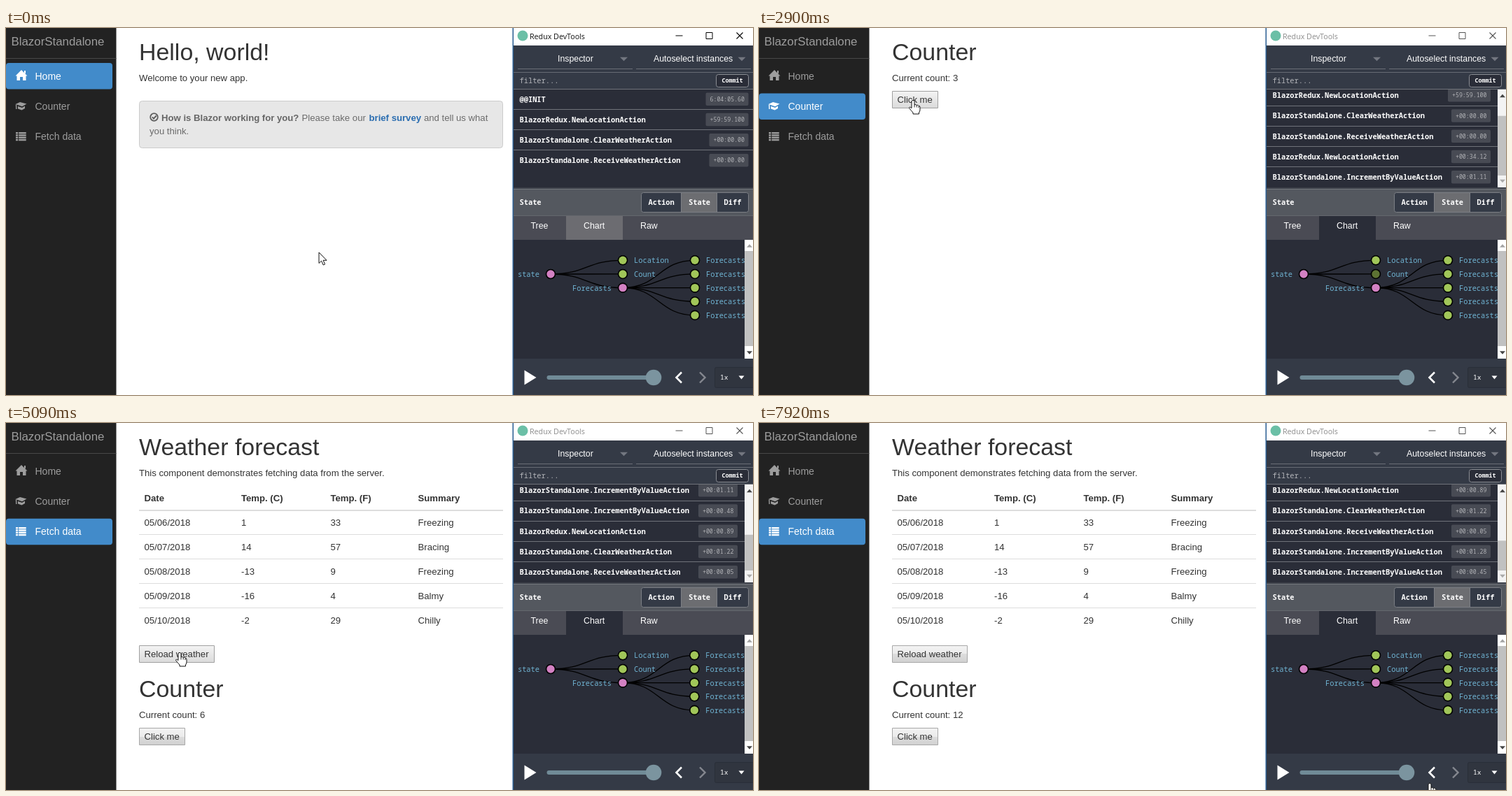
Animation of 1067x525 px, one loop 8 s. Source, as an HTML page with a canvas:

```html
<!DOCTYPE html>
<html lang="en">
<head>
<meta charset="utf-8">
<title>Store demo</title>
<style>
html, body { margin: 0; width: 100%; height: 100%; overflow: hidden; background: #fff; }
canvas { display: block; }
</style>
</head>
<body>
<canvas id="stage" width="1067" height="525"></canvas>
<script>
const g = document.getElementById('stage').getContext('2d');
const LOOP = 8000;
const SANS = '"Liberation Sans", Arial, sans-serif';
const MONO = '"Noto Sans Mono", "DejaVu Sans Mono", monospace';
const UI = '"Open Sans", "Noto Sans", sans-serif';
const BODY = 13.15, CODE = 10.37, ROW = 29.2;

// Cursor keys: time, x, y, linear
const PATH = [
  [0, 447, 321], [240, 447, 321], [1020, 100, 134], [1400, 86, 114], [1620, 86, 114],
  [2350, 220, 103], [3100, 220, 103], [3530, 104, 155], [4000, 104, 155], [4770, 248, 328],
  [5250, 248, 328], [6030, 232, 448], [6930, 232, 448], [7290, 589, 449, 1],
  [7610, 824, 463, 1], [7900, 958, 515, 1], [LOOP, 958, 515]
];

const MOVE = 'BlazorRedux.NewLocationAction';
const CLEAR = 'BlazorStandalone.ClearWeatherAction';
const RECEIVE = 'BlazorStandalone.ReceiveWeatherAction';
const ADD = 'BlazorStandalone.IncrementByValueAction';
const LOG = [
  [0, '@@INIT', '6:04:05.60'], [0, MOVE, '+59:59.100'],
  [0, CLEAR, '+00:00.00'], [0, RECEIVE, '+00:00.00'],
  [1560, MOVE, '+00:34.12'], [2600, ADD, '+00:01.11'],
  [3110, ADD, '+00:00.48'], [3800, MOVE, '+00:00.89'],
  [4960, CLEAR, '+00:01.22'], [5060, RECEIVE, '+00:00.05'],
  [6300, ADD, '+00:01.28'], [6770, ADD, '+00:00.45']
];
const CLICKS = [2560, 3010, 6250, 6760];
const FLASH = { Location: [1640, 3840], Count: [2640, 3140, 6400, 6890] };
const WEATHER = [
  ['05/06/2018', 1, 33, 'Freezing'], ['05/07/2018', 14, 57, 'Bracing'],
  ['05/08/2018', -13, 9, 'Freezing'], ['05/09/2018', -16, 4, 'Balmy'],
  ['05/10/2018', -2, 29, 'Chilly']
];
const COLS = [197.5, 336, 463.5, 588.5];

const ARROW = new Path2D('M0 0V15.5L3.6 12.2L6.2 18L8.6 17L6.1 11.3H11Z');
const HAND = new Path2D('M-2 1.5Q0 -1 2 1.5V7Q4 5.5 5.2 7.6Q7 6.3 8 8.4Q10 8 10 10.5V14Q10 16 8.5 18V20H0V18Q-2 16 -5.5 11.5Q-5.5 9 -2 11.5Z');

function text(s, x, y, size, color, font = SANS, weight = 400, align = 'left') {
  g.font = `${weight} ${size}px ${font}`;
  g.fillStyle = color;
  g.textAlign = align;
  g.fillText(s, x, y + size * 0.35);
}
const code = (s, x, y, color = '#fff', weight = 600, size = CODE, align) =>
  text(s, x, y, size, color, MONO, weight, align);

function rect(x, y, w, h, fill) {
  g.fillStyle = fill;
  g.fillRect(x, y, w, h);
}
function box(x, y, w, h, r, fill, stroke) {
  g.beginPath();
  g.roundRect(x, y, w, h, r);
  if (fill) { g.fillStyle = fill; g.fill(); }
  if (stroke) { g.strokeStyle = stroke; g.lineWidth = 1; g.stroke(); }
}
function poly(points, fill) {
  g.beginPath();
  points.forEach(p => g.lineTo(p[0], p[1]));
  g.fillStyle = fill;
  g.fill();
}
function line(points, color, width) {
  g.beginPath();
  points.forEach(p => g.lineTo(p[0], p[1]));
  g.strokeStyle = color;
  g.lineWidth = width;
  g.stroke();
}
function disc(x, y, r, fill) {
  g.beginPath();
  g.arc(x, y, r, 0, 7);
  g.fillStyle = fill;
  g.fill();
}
const caret = (x, y, w, h, color) => poly([[x - w, y - h], [x + w, y - h], [x, y + h]], color);
const inside = (c, x, y, w, h) => c.x >= x && c.x <= x + w && c.y >= y && c.y <= y + h;

function cursorAt(t) {
  let i = 1;
  while (i < PATH.length - 1 && PATH[i][0] < t) i++;
  const a = PATH[i - 1], b = PATH[i];
  let k = (t - a[0]) / (b[0] - a[0]);
  if (!b[3]) k = k * k * (3 - 2 * k);
  return { x: a[1] + (b[1] - a[1]) * k, y: a[2] + (b[2] - a[2]) * k, hand: false };
}

function homeIcon(c) {
  poly([[13.5, 68.5], [22, 60], [30.5, 68.5], [28.5, 68.5], [28.5, 75], [24, 75],
    [24, 70], [20, 70], [20, 75], [15.5, 75], [15.5, 68.5]], c);
  rect(26, 61, 2, 4, c);
}
function capIcon(c) {
  poly([[13.5, 109], [20, 106], [29.5, 108.5], [23, 112.2]], c);
  poly([[17, 112], [23, 114], [27, 111.5], [27, 115], [22.5, 117.5], [17, 115.5]], c);
  line([[14.5, 109.5], [14.8, 116]], c, 1.4);
}
function listIcon(c) {
  for (let i = 0; i < 4; i++) {
    rect(14, 149 + i * 3.3, 3.2, 2.4, c);
    rect(18.2, 149 + i * 3.3, 10.5, 2.4, c);
  }
}

function sidebar(page, cur) {
  rect(0, 0, 157.5, 525, '#222');
  text('BlazorStandalone', 7.5, 19.5, 16.85, '#9d9d9d');
  rect(0, 43, 157.5, 1, '#484848');
  [['Home', homeIcon], ['Counter', capIcon], ['Fetch data', listIcon]].forEach(([name, icon], i) => {
    const y = 50 + i * 43.4, active = i === page;
    const color = active || inside(cur, 0, y, 152, 37.5) ? '#fff' : '#9d9d9d';
    if (active) box(0, y, 152, 37.5, 4, '#428bca');
    icon(color);
    text(name, 41.5, y + 18.7, 14, color);
  });
}

function button(label, y, w, cur) {
  const hot = inside(cur, 190, y, w, 25);
  const fill = g.createLinearGradient(0, y, 0, y + 25);
  const stops = hot ? [[0, '#f4f4f4'], [1, '#dadada']]
    : [[0, '#f3f3f3'], [0.5, '#ebebeb'], [0.5, '#dddddd'], [1, '#d0d0d0']];
  stops.forEach(s => fill.addColorStop(s[0], s[1]));
  box(190.5, y + 0.5, w - 1, 24, 0, fill, hot ? '#a0a0a0' : '#a8a8a8');
  text(label, 197.5, y + 12, BODY, '#333');
  if (hot) cur.hand = true;
}
const title = (s, y) => text(s, 190, y, 33.9, '#333');
const para = (s, y) => text(s, 190, y, BODY, '#333');

function counter(y, count, cur) {
  title('Counter', y);
  para('Current count: ' + count, y + 37);
  button('Click me', y + 56, 66, cur);
}

function home() {
  title('Hello, world!', 34);
  para('Welcome to your new app.', 71);
  box(190.5, 104.5, 519, 67, 4, '#e7e7e7', '#cbcbcb');
  g.beginPath();
  g.arc(211.5, 127.5, 5.3, 0, 7);
  g.strokeStyle = '#5f5f5f';
  g.lineWidth = 1.8;
  g.stroke();
  line([[208.8, 127.3], [211, 129.6], [214.6, 125.5]], '#5f5f5f', 1.9);
  text('How is Blazor working for you?', 222, 128.5, BODY, '#666', SANS, 700);
  text('Please take our', 422.5, 128.5, BODY, '#6b6b6b');
  text('brief survey', 518.5, 128.5, BODY, '#2a6db0', SANS, 700);
  text('and tell us what', 597, 128.5, BODY, '#6b6b6b');
  text('you think.', 205, 147.5, BODY, '#6b6b6b');
}

function forecast(loading, count, cur) {
  title('Weather forecast', 34);
  para('This component demonstrates fetching data from the server.', 71);
  if (loading) {
    para('Loading...', 99);
    counter(146, count, cur);
    return;
  }
  ['Date', 'Temp. (C)', 'Temp. (F)', 'Summary'].forEach((s, i) =>
    text(s, COLS[i], 107, BODY, '#333', SANS, 700));
  rect(190, 124, 520, 2, '#ddd');
  WEATHER.forEach((row, r) => {
    const y = 142.5 + r * 34.9;
    if (r) rect(190, Math.round(y - 18), 520, 1, '#ddd');
    row.forEach((v, i) => text(String(v), COLS[i], y, BODY, '#333'));
  });
  button('Reload weather', 318, 108, cur);
  counter(380, count, cur);
}

function titleBar(active) {
  const ink = active ? '#000' : '#555';
  rect(724, 0, 343, 25, '#fff');
  disc(738, 11, 7.5, '#6bbfa6');
  text('Redux DevTools', 748, 11.8, 10.7, active ? '#111' : '#8c8c8c', UI);
  rect(956.5, 10.5, 10, 1, ink);
  box(1000, 6.5, 9, 9, 0, null, ink);
  line([[1043.5, 6.5], [1052.5, 15.5]], ink, 1.1);
  line([[1052.5, 6.5], [1043.5, 15.5]], ink, 1.1);
}

function actionList(t) {
  const log = LOG.filter(e => e[0] <= t), n = log.length;
  const full = n * ROW > 141, right = full ? 1045 : 1060.5;
  g.save();
  g.beginPath();
  g.rect(725, 88, 342, 140);
  g.clip();
  log.forEach((e, i) => {
    const y = full ? 213.4 - ROW * (n - 1 - i) : 102 + ROW * i;
    if (y < 80) return;
    if (i < n - 1) rect(725, Math.round(y + 14), 342, 1, '#70737a');
    code(e[1], 733.5, y);
    const w = e[2].length * 4.95 + 11.5;
    box(right - w, y - 9.5, w, 18.5, 2, '#484b54');
    code(e[2], right - 5.5, y, '#b2b3b7', 400, 8.25, 'right');
  });
  if (full) {
    rect(1055, 88, 12, 140, '#f3f3f3');
    const len = 106 * 141 / (n * ROW);
    rect(1055, 211 - len, 12, len, '#c1c1c1');
    caret(1062, 97, 4, -2.2, '#444');
    caret(1062, 219, 4, 2.2, '#aaa');
  }
  g.restore();
}

function flash(name, t) {
  const start = (FLASH[name] || []).filter(s => s <= t).pop();
  const k = start === undefined ? 1 : Math.min(1, (t - start) / 750);
  return 1 - (1 - k) * (1 - k);
}
function link(x0, y0, x1, y1) {
  const m = (x0 + x1) / 2;
  g.beginPath();
  g.moveTo(x0, y0);
  g.bezierCurveTo(m, y0, m, y1, x1, y1);
  g.strokeStyle = '#000';
  g.lineWidth = 1.3;
  g.stroke();
}
function node(x, y, label, parent, level = 1) {
  const rgb = (parent ? [211, 129, 195] : [161, 198, 89]).map(v => Math.round(v * level));
  disc(x, y, 7.3, '#000');
  disc(x, y, 5.7, `rgb(${rgb})`);
  code(label, x + (parent ? -16 : 16), y + 0.5, '#6fb3d2', 400, CODE, parent ? 'right' : 'left');
}

function chart(t) {
  g.save();
  g.beginPath();
  g.rect(725, 303, 330, 170);
  g.clip();
  // Leaves recoil briefly while the list is refilled
  const nudge = t > 4960 && t < 5500 ? Math.sin(Math.PI * (t - 4960) / 540) : 0;
  const leaves = [0, 1, 2, 3, 4].map(i => 332.3 + i * 19.65);
  const mid = leaves.slice(0, 3);
  mid.forEach(y => link(778, 352, 881, y));
  leaves.forEach(y => link(881, 371.6, 984 - nudge, y));
  node(778, 352, 'state', true);
  node(881, mid[0], 'Location', false, flash('Location', t));
  node(881, mid[1], 'Count', false, flash('Count', t));
  node(881, mid[2], 'Forecasts', true);
  leaves.forEach(y => node(984 - nudge, y, 'Forecasts', false));
  g.restore();
  rect(1055, 303, 12, 170, '#fff');
  rect(1055, 319, 12, 136, '#c1c1c1');
  caret(1062, 311.5, 4, -2.2, '#a3a3a3');
  caret(1062, 464.5, 4, 2.2, '#444');
}

function player() {
  rect(725, 473, 342, 52, '#343a46');
  poly([[740.5, 489.5], [757.5, 500], [740.5, 510.5]], '#fff');
  box(772.5, 497, 152, 6, 3, '#708b97');
  disc(925, 500, 11.3, '#7b949f');
  line([[965, 492.5], [957.5, 500], [965, 507.5]], '#fff', 2.6);
  line([[991, 492.5], [998.5, 500], [991, 507.5]], '#858890', 2.4);
  box(1012.5, 485.5, 60, 29, 2, '#30353f', '#292e38');
  code('1x', 1020, 500, '#fff', 500, 9.6);
  caret(1050.5, 500, 4, 2.4, '#fff');
}

function devtools(t) {
  rect(724, 24, 343, 501, '#2a2d38');
  titleBar(t < 1440);
  rect(725, 25, 342, 62, '#343a46');
  text('Inspector', 788, 43.5, 12.35, '#fff');
  text('Autoselect instances', 925, 43.5, 12.35, '#fff');
  caret(882.5, 44.5, 5.5, 2.8, '#737780');
  caret(1051, 44.5, 5.5, 2.8, '#737780');
  rect(731, 58, 164, 1, '#6a6e77');
  rect(900, 58, 164, 1, '#6a6e77');
  rect(725, 63, 342, 1, '#666a73');
  code('filter...', 733.5, 75.5, '#b4b6ba', 400);
  box(1014.5, 66.5, 46, 18, 3, '#2a2d38', '#8b8e94');
  code('Commit', 1037.5, 75.5, '#fff', 600, 8.4, 'center');
  rect(725, 87, 342, 1, '#70737a');
  actionList(t);

  rect(725, 228, 342, 2, '#3c4049');
  rect(725, 230, 342, 38, '#54585f');
  rect(725, 230, 342, 1, '#74777d');
  code('State', 733.5, 249.5);
  box(907.5, 235.5, 153, 28, 3, '#343a46', '#7c7f85');
  rect(965, 236, 51, 27, '#6c6d71');
  rect(964, 236, 1, 27, '#7c7f85');
  rect(1015, 236, 1, 27, '#7c7f85');
  code('Action', 917.5, 249.5);
  code('State', 975, 249.5);
  code('Diff', 1025.5, 249.5);

  rect(725, 268, 342, 35, '#4a4b54');
  rect(725, 268, 342, 1, '#64676d');
  rect(800, 269, 81, 34, t < 1560 ? '#6c6c71' : '#2a2d38');
  text('Tree', 749.5, 283, 12.35, '#fff');
  text('Chart', 825, 283, 12.35, '#fff');
  text('Raw', 906, 283, 12.35, '#fff');

  chart(t);
  player();
  rect(723.5, 0, 1.5, 525, '#2b5f93');
}

function pointer(c) {
  g.save();
  g.translate(c.x, c.y);
  const shape = c.hand ? HAND : ARROW;
  g.fillStyle = '#fff';
  g.fill(shape);
  g.strokeStyle = '#111';
  g.lineWidth = 1;
  g.lineJoin = 'round';
  g.stroke(shape);
  if (c.hand) {
    line([[2, 7], [2, 10.5]], '#111', 0.9);
    line([[5.2, 8], [5.2, 10.5]], '#111', 0.9);
    line([[8, 9], [8, 11]], '#111', 0.9);
  }
  g.restore();
}

function draw(t) {
  const cur = cursorAt(t);
  const page = t < 1560 ? 0 : t < 3740 ? 1 : 2;
  const count = 3 * CLICKS.filter(c => c <= t).length;
  rect(0, 0, 1067, 525, '#fff');
  sidebar(page, cur);
  if (page === 0) home();
  else if (page === 1) counter(34, count, cur);
  else forecast(t >= 4890 && t < 5060, count, cur);
  devtools(t);
  if (inside(cur, 945, 488, 30, 37)) cur.hand = true;
  pointer(cur);
}

const start = performance.now();
function tick(now) {
  draw(Math.max(0, now - start) % LOOP);
  requestAnimationFrame(tick);
}
draw(0);
requestAnimationFrame(tick);
</script>
</body>
</html>
```
